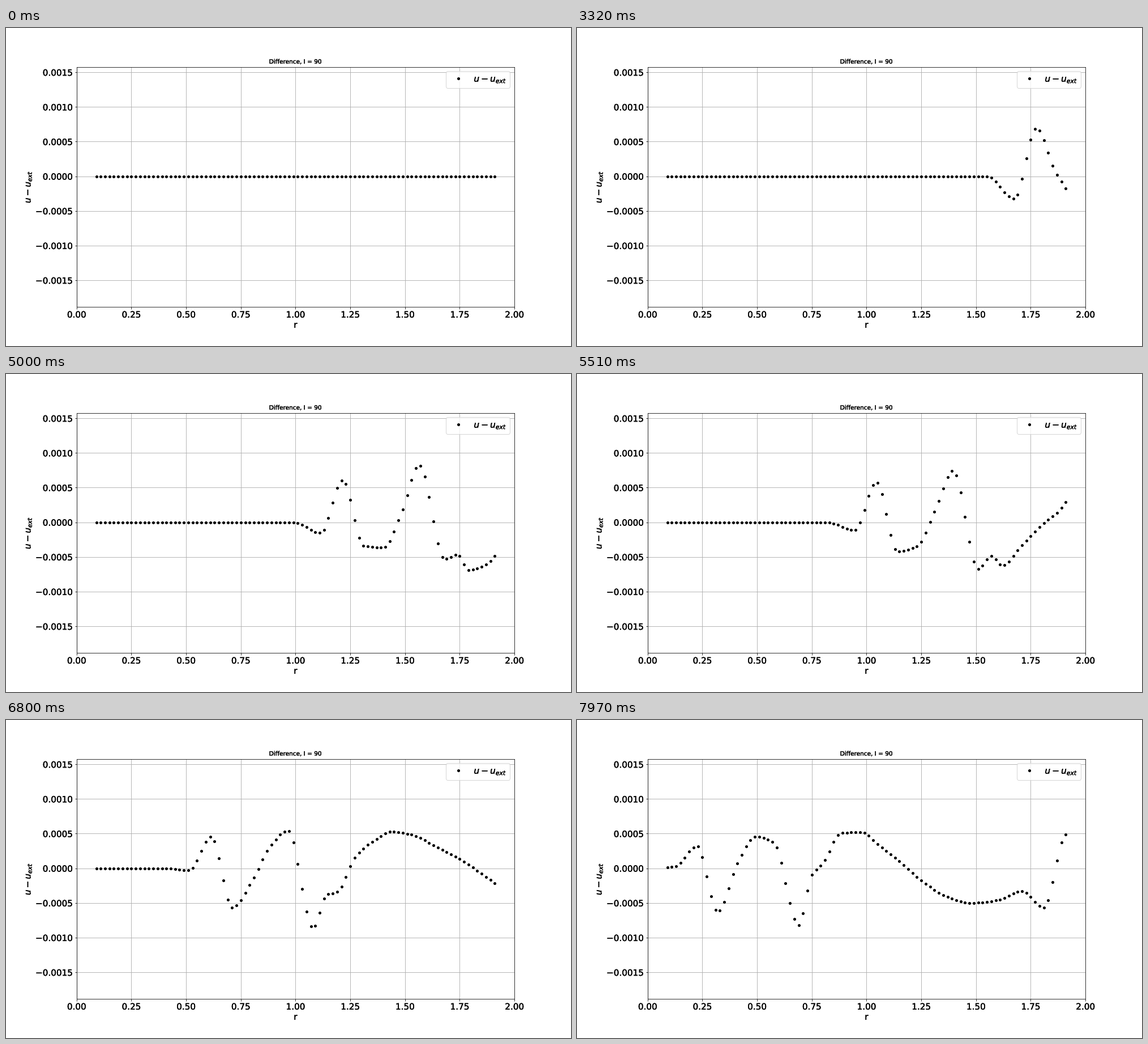
Write a matplotlib script that moves like this. It is 998x561 px and loops after 8 s.

```python
import numpy as np
import matplotlib.pyplot as plt
from matplotlib.animation import FuncAnimation
from matplotlib.patheffects import withStroke

W, H, DPI = 998, 561, 72
FRAMES, INTERVAL = 400, 20
STEP_MS, FIRST_MS = 30, 20   # one solver step on screen, and the first one
END = 265                    # last solver step
SPEED = 0.01                 # distance a wave travels inwards per step
R_MAX = 1.91
SIZE = 15.2
RECT = [124.75 / W, 69.2 / H, 773.4 / W, 423.0 / H]
XLIM, YLIM = (0, 2), (-0.001882, 0.001576)

plt.rcParams.update({"font.family": "DejaVu Sans", "font.size": SIZE})

# Crests, troughs and shoulders of the wave. Each keeps its phase r + SPEED * step
# while its height (unit 1e-5) goes: on entering, halfway, at the end.
FEATURES = np.array([
    (2.650, 0, 0, 0),
    (2.775, -41, -13, 2.5),
    (2.875, 70, 58, 32),
    (2.970, 5, -43, -63),
    (3.060, -30, -33, 7),
    (3.145, 5, 22, 46),
    (3.225, 100, 67, 37.5),
    (3.340, -28, -80, -82),
    (3.400, -40, -46, -9),
    (3.450, -72, -47, 7),
    (3.535, -65, 4, 51),
    (3.630, -22, 37, 52),
    (3.700, 7, 52, 34.5),
    (3.800, 50, 47, 10),
    (3.900, 62, 24, -17.5),
    (4.020, 43, -9, -41.5),
    (4.130, -5, -37, -50),
    (4.250, -38, -51, -46),
    (4.360, -49.5, -42, -33),
    (4.460, -57, -57, -57),
    (4.560, 48.5, 48.5, 48.5),
])
PHASE, ENTER, HALF, FINAL = FEATURES.T
ENTER_STEP = (PHASE - R_MAX) / SPEED

r = 0.09 + 0.02 * np.arange(92)


def heights(step):
    """Height of every feature: a parabola in time through its three values."""
    life = np.maximum(END - ENTER_STEP, 1)
    u = np.clip((step - ENTER_STEP) / life, 0, 1)
    return (ENTER * (1 - u) * (1 - 2 * u) + 4 * HALF * u * (1 - u)
            + FINAL * u * (2 * u - 1))


def monotone_curve(x, xk, yk):
    """Cubic through the knots that does not overshoot them."""
    h = np.diff(xk)
    d = np.diff(yk) / h
    prod = d[:-1] * d[1:]
    slope = np.zeros_like(yk)
    np.divide(2 * prod, d[:-1] + d[1:], out=slope[1:-1], where=prod > 0)
    x = np.clip(x, xk[0], xk[-1])
    i = np.clip(np.searchsorted(xk, x) - 1, 0, len(h) - 1)
    u = (x - xk[i]) / h[i]
    ease = u * u * (3 - 2 * u)
    return (yk[i] * (1 - ease) + yk[i + 1] * ease
            + h[i] * u * (1 - u) * (slope[i] * (1 - u) - slope[i + 1] * u))


def error_at(step):
    return 1e-5 * monotone_curve(r + SPEED * step, PHASE, heights(step))


# ---- chart ----
DOTS = dict(ls="none", marker="o", ms=4, mew=1, color="black")
fig = plt.figure(figsize=(W / DPI, H / DPI), dpi=DPI, facecolor="white")


def draw_chart():
    ax = fig.add_axes(RECT, xlim=XLIM, ylim=YLIM)
    ax.grid(True, color="#b0b0b0", lw=0.9)
    ax.set_axisbelow(True)
    xt = np.arange(0, 2.01, 0.25)
    yt = np.arange(-3, 4) * 0.0005
    ax.set_xticks(xt, [f"{x:.2f}" for x in xt])
    ax.set_yticks(yt, [f"{y:.4f}".replace("-", "\u2212") for y in yt])
    ax.set_xlabel("r", labelpad=3)
    ax.set_ylabel(r"$u - u_{ext}$")
    ax.set_title("Difference, I = 90", fontsize=10.5)
    ax.plot([], [], label=r"$u - u_{ext}$", **DOTS)
    legend = ax.legend(loc="upper right", fontsize=15.4)
    # slightly heavier lettering
    heavy = [withStroke(linewidth=0.4, foreground="black")]
    for text in (ax.get_xticklabels() + ax.get_yticklabels() + legend.get_texts()
                 + [ax.title, ax.xaxis.label, ax.yaxis.label]):
        text.set_path_effects(heavy)


# The chart never changes, so it is rendered once and kept as a backdrop.
draw_chart()
fig.canvas.draw()
backdrop = np.array(fig.canvas.buffer_rgba())
fig.clear()
fig.figimage(backdrop, 0, 0, origin="upper", zorder=-1)

ax = fig.add_axes(RECT, xlim=XLIM, ylim=YLIM)
ax.axis("off")
dots, = ax.plot(r, np.zeros_like(r), **DOTS)


def update(frame):
    t = frame * INTERVAL + INTERVAL // 2
    step = min(max((t - FIRST_MS) // STEP_MS, 0), END)
    dots.set_ydata(error_at(step))
    return dots,


anim = FuncAnimation(fig, update, frames=FRAMES, interval=INTERVAL,
                     init_func=lambda: update(0), repeat=True, repeat_delay=0)
plt.show()
```
